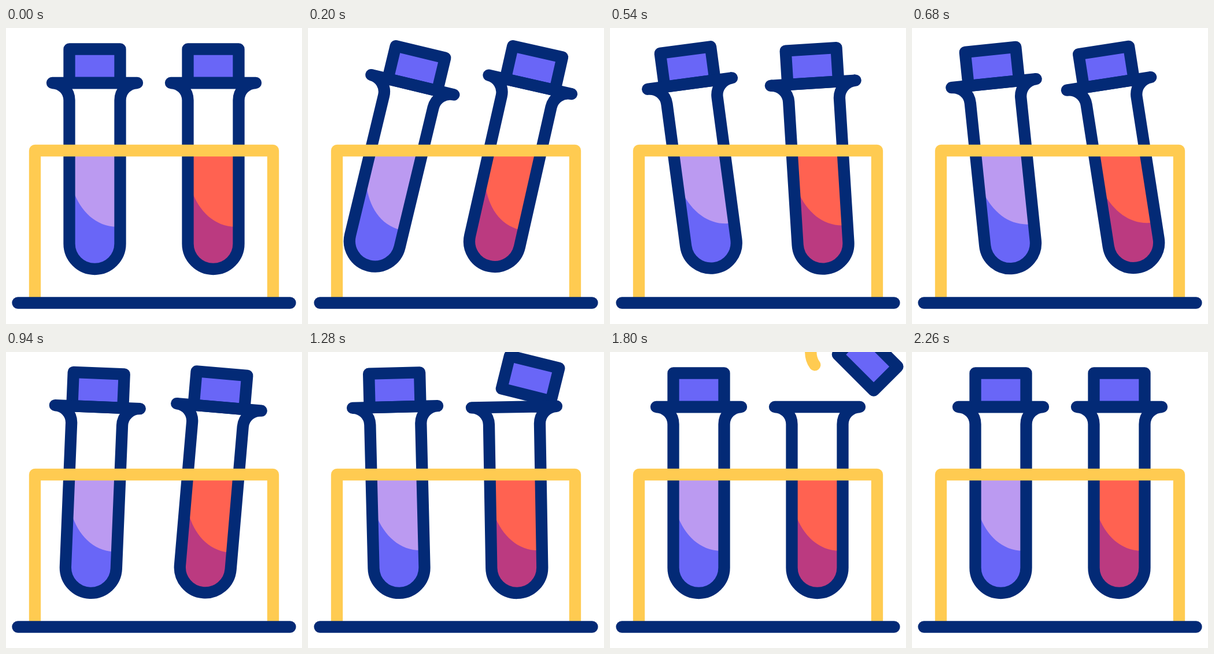
Recreate the animation shown at these times as an HTML page. Size 512x512 px, loop 2.4 s.

```html
<!DOCTYPE html>
<html lang="en">
<head>
<meta charset="utf-8">
<title>Test tubes</title>
<style>
  html, body { margin: 0; width: 100%; height: 100%; overflow: hidden; background: #fff; }
  svg { display: block; width: 100vw; height: 100vh; }
  .line { stroke-width: 20.3; stroke-linecap: round; stroke-linejoin: round; fill: none; stroke: #032a76; }
  .yellow { stroke: #ffcb51; }
</style>
</head>
<body>
<svg viewBox="0 0 512 512">
  <defs>
    <path id="cap" class="line" style="fill:#6966f7" d="M-44-175.5H44V-117H-44Z"/>
    <path id="glass" class="line" d="M-73.5-117H73.5A30 30 0 0 0 44-87V161A44 44 0 0 1-44 161V-87A30 30 0 0 0-73.5-117Z"/>
    <path id="liquid" d="M-38 0H38V161A38 38 0 0 1-38 161Z"/>
    <path id="shade" d="M-38 68C-24 106 2 131 38 132V161A38 38 0 0 1-38 161Z"/>
  </defs>
  <path id="vapour" class="line yellow" pathLength="100" d="M354 72C372 55 370 42 354 22C345 10 345-10 354-28"/>
  <g id="left">
    <use href="#liquid" fill="#bb9af1"/><use href="#shade" fill="#6966f7"/>
    <use href="#cap"/><use href="#glass"/>
  </g>
  <g id="right">
    <use href="#liquid" fill="#ff6251"/><use href="#shade" fill="#bb3a80"/>
    <use href="#cap" id="lid"/><use href="#glass"/>
  </g>
  <path class="line yellow" style="stroke-linecap:butt" d="M50 470V212H462V470"/>
  <path class="line" d="M20.5 475.5H491.5"/>
</svg>
<script>
const LOOP = 2400;
const $ = id => document.getElementById(id);

const ramp = (t, from, to) => Math.min(1, Math.max(0, (t - from) / (to - from)));
const smooth = (t, from, to) => (1 - Math.cos(Math.PI * ramp(t, from, to))) / 2;

// Eases from rest to the first peak, then through the others at even steps.
function swing(t, first, step, peaks) {
  return peaks.reduce((angle, peak, i) => {
    const end = first + i * step;
    return angle + (peak - angle) * smooth(t, i ? end - step : 0, end);
  }, 0);
}

function draw() {
  const t = performance.now() % LOOP;
  const leftAngle = swing(t, 327, 262, [20, -10, 5, -5, 0]);
  const rightAngle = swing(t, 342, 287, [20, -10, 5, -1.2, 0]);
  $('left').setAttribute('transform', `translate(153.5 212) rotate(${leftAngle})`);
  $('right').setAttribute('transform', `translate(358.5 212) rotate(${rightAngle})`);

  // The lid overshoots a little, settles, then returns.
  const lift = Math.max(0, 1.08 * smooth(t, 1150, 1500) - 0.08 * smooth(t, 1660, 1800) - smooth(t, 2010, 2255));
  $('lid').setAttribute('transform',
    `translate(${87 * lift} ${-51 * lift ** 0.87}) rotate(${45 * lift} 0 -146)`);

  const head = 100 * ramp(t, 1440, 1700), tail = 100 * ramp(t, 1640, 1950);
  const vapour = $('vapour').style;
  vapour.display = head > tail ? '' : 'none';
  vapour.strokeDasharray = `${head - tail} 200`;
  vapour.strokeDashoffset = -tail;
  requestAnimationFrame(draw);
}
draw();
</script>
</body>
</html>
```
